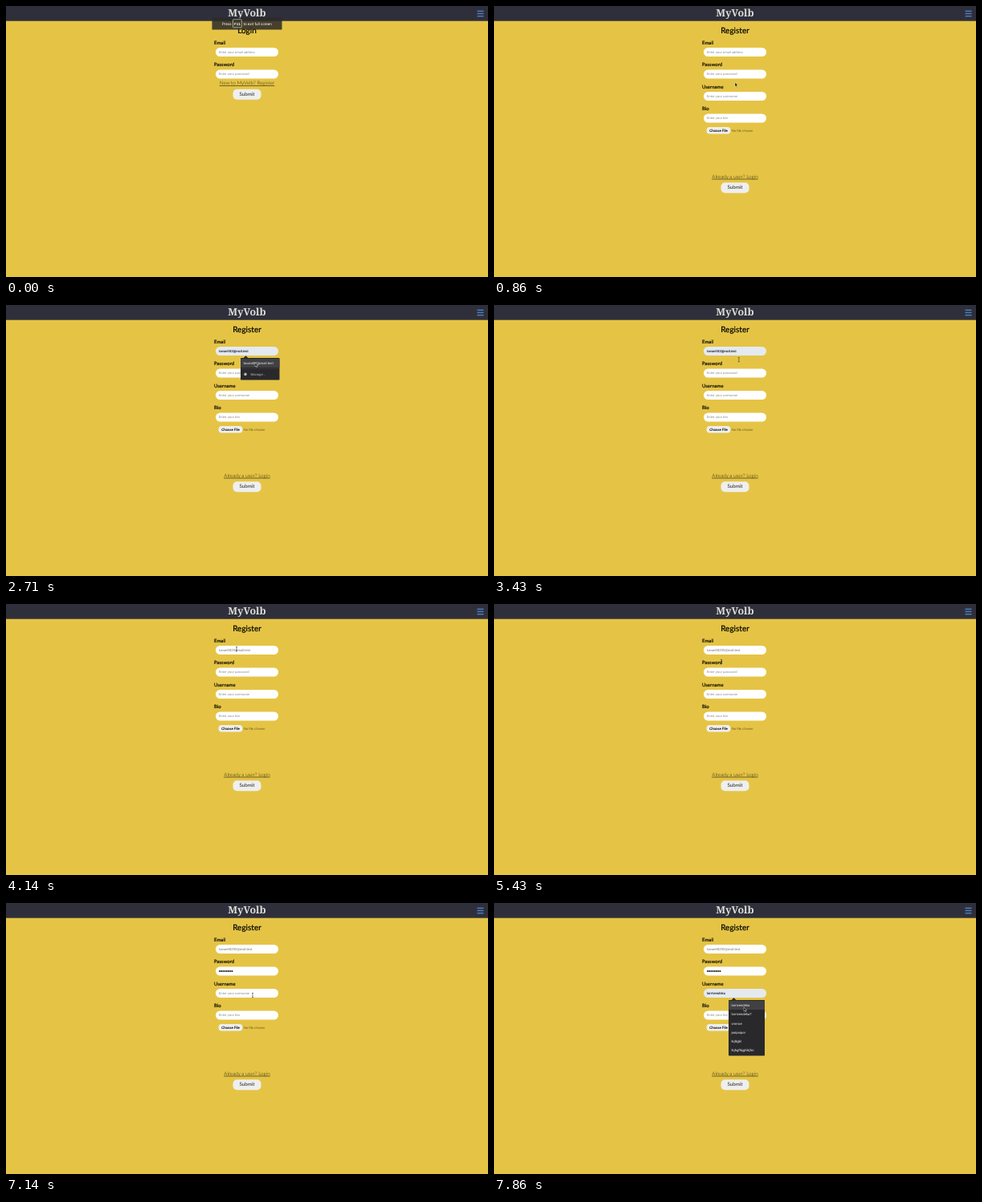
Animation, 600 px wide and 338 px high, one loop 8000 ms. Source, as an HTML page:

```html
<!DOCTYPE html>
<html lang="en">
<head>
<meta charset="utf-8">
<title>Register form</title>
<style>
html, body { margin: 0; width: 100%; height: 100%; overflow: hidden; background: #e5c445; }
svg { display: block; width: 100vw; height: 100vh; }
text { font: 4.2px Lato, sans-serif; text-rendering: geometricPrecision; }
.mid { text-anchor: middle; }
.brand { font: 600 12.5px "Noto Serif", serif; fill: #deded9; }
.heading { font-size: 10px; stroke: #000; stroke-width: .2px; }
.label { font-size: 6px; stroke: #000; stroke-width: .16px; }
.link { font-size: 6.3px; font-weight: 300; fill: #2a2410; text-decoration: underline; }
.submit { font-size: 6.2px; fill: #222; }
.hint { fill: #8b8b90; }
.typed { fill: #6c6c70; }
.preview { fill: #10182c; stroke: #10182c; stroke-width: .08px; }
.file { font-size: 4.4px; stroke: #000; stroke-width: .12px; }
.nofile { font-size: 4.3px; fill: #6b5b25; }
.menu { font-family: Roboto, sans-serif; fill: #f0f0f0; }
.notice { font: 4.66px Roboto, sans-serif; fill: #fff; }
.key { font: bold 4.2px "DejaVu Sans Mono", monospace; fill: #fff; }
</style>
</head>
<body>
<svg id="stage" viewBox="0 0 600 338"></svg>
<script>
const STEP = 1000 / 7, STEPS = 56;
const BRAND = 'MyVolb';
const USERS = ['lorrivendeka', 'lorrivendeka7', 'vmrroe', 'poipoipoi', 'lkjlkjjkl', 'lkjhgflkjghlkjfoi'];
const stage = document.getElementById('stage');

// pointer path: step, x, y, shape
const PATH = [
  [1, 124, 150, 'arrow'], [5, 300, 96, 'arrow'], [7, 300, 95, 'beam'],
  [11, 296, 79, 'beam'], [14, 297, 58, 'beam'], [16, 297, 58, 'arrow'],
  [18, 310, 72, 'arrow'], [23, 310, 72, 'beam'], [26, 290, 57, 'beam'],
  [29, 287, 56, 'beam'], [35, 287, 56, 'beam'], [38, 283, 72, 'beam'],
  [40, 283, 72, 'beam'], [41, 290, 85, 'beam'], [42, 290, 85, 'arrow'],
  [44, 192, 100, 'arrow'], [46, 355, 106, 'arrow'], [48, 322, 111, 'beam'],
  [50, 307, 115, 'beam'], [52, 307, 115, 'arrow'], [54, 311, 130, 'arrow'],
  [56, 311, 130, 'arrow']
];

const rect = (x, y, w, h, fill, r = 0) =>
  `<rect x="${x}" y="${y}" width="${w}" height="${h}" rx="${r}" fill="${fill}"/>`;
const text = (x, y, s, cls) => `<text x="${x}" y="${y}" class="${cls}">${s}</text>`;

function field(row, label, content, cls = 'hint') {
  const y = 52 + row * 27.5;
  const fill = cls === 'preview' ? '#e5eaf1' : '#fff';
  return text(259, y - 4.4, label, 'label') + rect(261, y, 78, 11, fill, 5.5) +
    (content ? text(265, y + 6.7, content, cls) : '');
}

function footer(y, label) {
  return text(300, y, label, 'link mid') + rect(282.5, y + 5.5, 35, 13, '#efefef', 5) +
    text(300, y + 13.7, 'Submit', 'submit mid');
}

function header() {
  return rect(0, 0, 600, 18.7, '#2f2f3b') + text(300, 13.4, BRAND, 'brand mid') +
    [5.7, 8.8, 12].map(y => rect(586.5, y, 8, 1.4, '#4a80c4')).join('');
}

function notice() {
  return rect(256.5, 14.5, 87, 15, 'rgba(45,43,40,.86)') +
    text(269, 23.6, 'Press', 'notice') + text(295.5, 23.6, 'to exit full screen', 'notice') +
    '<rect x="282.5" y="16.8" width="10.8" height="10" rx=".6" fill="none" stroke="#ddd" stroke-width=".6"/>' +
    text(287.9, 23.5, 'F11', 'key mid');
}

function popup(y, w, h, hover) {
  return `<path d="M295.5 ${y + .3}l3-3 3 3z" fill="#29292c"/>` + rect(292, y, w, h, '#29292c', .8) +
    (hover ? rect(292, y + 1, w, 11, '#414144') : '');
}

function emailMenu(hover) {
  return popup(66, 48.5, 27.5, hover) + text(295.5, 73.9, 'tovan482@mail.test', 'menu') +
    rect(292, 79, 48.5, .4, '#48484b') + '<circle cx="298" cy="86.4" r="1.8" fill="#b5b5b8"/>' +
    `<g opacity=".7">${text(304.5, 87.8, 'Manage...', 'menu')}</g>`;
}

function userMenu(hover) {
  return popup(121, 45, 69.5, hover) +
    USERS.map((name, i) => text(295.5, 128.9 + i * 11.3, name, 'menu')).join('');
}

function pointer(k) {
  if (k < 1) return '';
  const i = PATH.findIndex(p => p[0] > k) - 1;
  const [k0, x0, y0, shape] = PATH[i], [k1, x1, y1] = PATH[i + 1];
  const u = (k - k0) / (k1 - k0), e = u * u * (3 - 2 * u);
  const at = `transform="translate(${x0 + (x1 - x0) * e} ${y0 + (y1 - y0) * e})"`;
  return shape === 'beam'
    ? `<path ${at} d="M-1-2.6h2M-1 2.6h2M0-2.6v5.2" fill="none" stroke="#333" stroke-width=".6"/>`
    : `<path ${at} d="M0 0v5l1.2-1.1.9 2 .8-.4-.9-1.9h1.6z" fill="#111" stroke="#fff" stroke-width=".4"/>`;
}

function loginPage() {
  return text(300, 33.8, 'Login', 'heading mid') +
    field(0, 'Email', 'Enter your email address') + field(1, 'Password', 'Enter your password') +
    footer(98.2, `New to ${BRAND}? Register`);
}

function registerPage(k) {
  const digits = k < 28 ? '' : k < 31 ? '5' : '55';
  const email = k < 18 ? ['Enter your email address']
    : [`tovan482${digits}@mail.test`, k < 28 ? 'preview' : 'typed'];
  const dots = Math.max(0, Math.min(8, (k - 41) * 2));
  const user = k < 54 ? ['Enter your username'] : [USERS[0], 'preview'];
  let s = text(300, 33.8, 'Register', 'heading mid') + field(0, 'Email', ...email) +
    field(1, 'Password', dots ? '' : 'Enter your password') +
    field(2, 'Username', ...user) + field(3, 'Bio', 'Enter your bio') +
    rect(264.5, 151, 30, 8.6, '#efefef', 4) + text(279.5, 156.8, 'Choose File', 'file mid') +
    text(295.5, 156.8, 'No file chosen', 'nofile') + footer(214.7, 'Already a user? Login');
  for (let i = 0; i < dots; i++) s += `<circle cx="${266 + i * 2.2}" cy="85" r=".9"/>`;
  if (k >= 15 && k < 22) s += emailMenu(k >= 18);
  if (k >= 52) s += userMenu(k >= 54);
  return s;
}

function draw(k) {
  stage.innerHTML = rect(0, 0, 600, 338, '#e5c445') + header() +
    (k < 6 ? loginPage() : registerPage(k)) + (k < 4 ? notice() : '') + pointer(k);
}

let last = -1;
const start = performance.now();
function tick() {
  const k = Math.floor(((performance.now() - start) % 8000 + 6) / STEP) % STEPS;
  if (k !== last) draw(last = k);
  requestAnimationFrame(tick);
}
tick();
</script>
</body>
</html>
```
